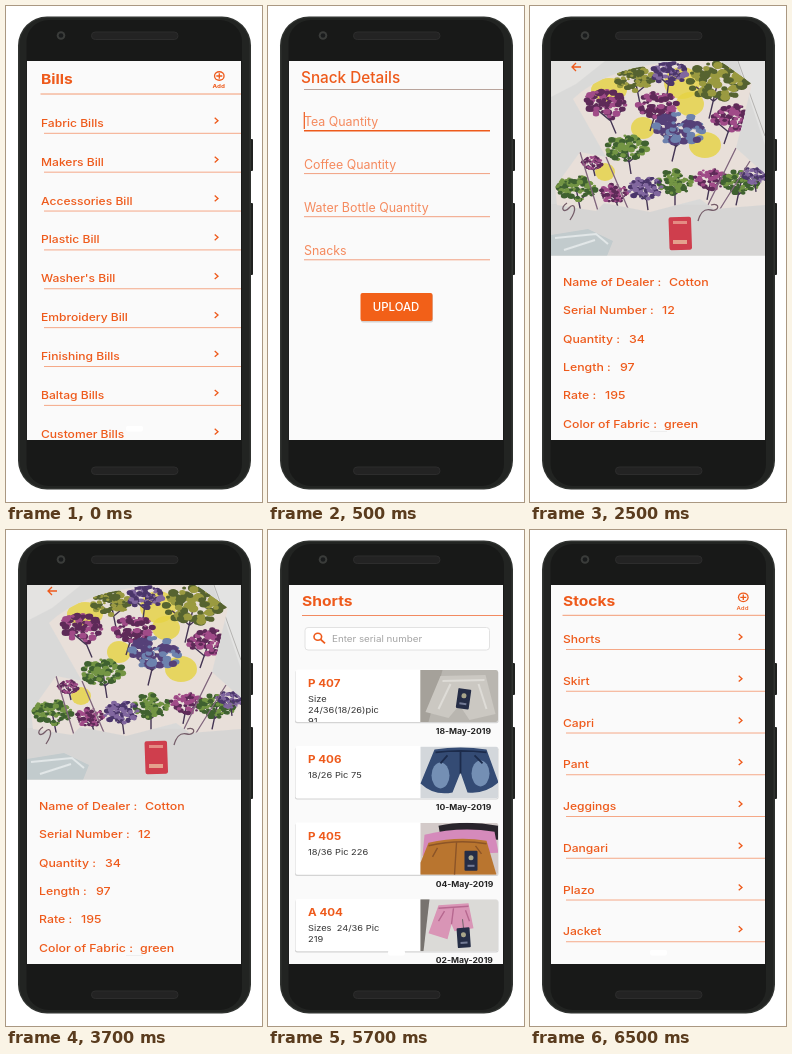
These frames come from a looping animation (256x496 px, 8000 ms). An HTML page:

```html
<!DOCTYPE html>
<html lang="en">
<head>
<meta charset="utf-8">
<title>Shop app screens</title>
<style>
  html, body { margin: 0; width: 100%; height: 100%; overflow: hidden; background: #fff; }
  svg { display: block; font-family: Inter, "Open Sans", sans-serif; }
  text { white-space: pre; }
</style>
</head>
<body>
<svg id="stage" width="256" height="496" viewBox="0 0 256 496"></svg>
<script>
const ORANGE = '#ee5a1b', RULE = '#f5a887', PAPER = '#fafafa';
const FLAT = .88; // most screens are shown with a slightly flattened aspect

const rect = (x, y, w, h, fill, r = 0, extra = '') =>
  `<rect x="${x}" y="${y}" width="${w}" height="${h}" rx="${r}" fill="${fill}" ${extra}/>`;
const text = (x, y, s, size, weight = 500, fill = ORANGE, aspect = FLAT) =>
  `<text transform="translate(${x} ${y}) scale(1 ${aspect})" font-size="${size}" font-weight="${weight}" fill="${fill}">${s}</text>`;
const path = (d, stroke, width = 1, fill = 'none') =>
  `<path d="${d}" stroke="${stroke}" stroke-width="${width}" fill="${fill}"/>`;
const shape = (d, fill) => path(d, 'none', 0, fill);
const circle = (x, y, r, fill, extra = '') =>
  `<circle cx="${x}" cy="${y}" r="${r}" fill="${fill}" ${extra}/>`;
const ellipse = (x, y, rx, ry, fill, opacity = 1) =>
  `<ellipse cx="${x}" cy="${y}" rx="${rx}" ry="${ry}" fill="${fill}" opacity="${opacity}"/>`;
const rule = (x, y, end = 235, color = RULE) => path(`M${x} ${y}H${end}`, color);
const clip = (id, content) => `<clipPath id="${id}">${content}</clipPath>`;

let seed = 7;
const random = () => (seed = seed * 16807 % 2147483647) / 2147483647;

function phone() {
  const speaker = y => rect(85.5, y, 86.5, 7.5, '#232323', 3.7, 'stroke="#2d2d2d"');
  return rect(243, 133, 4, 32, '#202220', 1) + rect(243, 197, 4, 72, '#202220', 1) +
    rect(12, 10.5, 233, 473, '#303330', 29) +
    rect(13.5, 12, 230, 470, '#222422', 27) +
    rect(20.5, 14, 215.5, 466, '#181918', 22) +
    speaker(26) + speaker(461) +
    circle(55, 29.5, 4.3, '#3a3c3a') + circle(55, 29.5, 2.3, '#191b1c');
}

const homePill = () => rect(120, 420, 17, 5.5, '#fff', 2);

function listScreen({ title, x, titleY, headY, first, step, addBold, items }) {
  const addY = headY - 18;
  const rows = items.map((name, i) => {
    const y = first + i * step;
    return text(x, y, name, 12.1) + rule(x + 3, y + 6.5) +
      path(`M208.7 ${y - 9}l3.3 2.9l-3.3 2.9`, ORANGE, 1.3);
  }).join('');
  return text(x, titleY, title, 15.6, 700) + rule(x - .5, headY, 235, '#f39a73') +
    ellipse(213.3, addY, 5.4, 4.9, ORANGE) + ellipse(213.3, addY, 4.1, 3.6, PAPER) +
    path(`M210.3 ${addY}h6M213.3 ${addY - 2.7}v5.4`, ORANGE, 1.3) +
    text(206.5, addY + 12.3, 'Add', 6.2, addBold ? 700 : 500) + rows + homePill();
}

function formScreen() {
  const fields = ['Tea Quantity', 'Coffee Quantity', 'Water Bottle Quantity', 'Snacks'];
  return text(33, 76.5, 'Snack Details', 15.3, 500, ORANGE, 1) + rule(36, 83.5, 235, '#b9a49c') +
    fields.map((name, i) => {
      const y = 119.7 + i * 43.1;
      return text(36, y, name, 12.4, 400, '#f58a5e', 1) +
        (i ? rule(36, y + 4.8, 222, '#f2a080') : path(`M36 ${y + 5}H222`, ORANGE, 1.6));
    }).join('') +
    path('M36.3 106V123', ORANGE, 1.2) +
    rect(93, 288, 72, 28.5, '#d5d1cf', 2) + rect(92.5, 287, 72, 28, '#f26018', 2) +
    text(104.8, 305.3, 'UPLOAD', 11.4, 500, '#fff', 1);
}

// A printed tree: forked trunk under a crown of small leaves in two tones.
function tree(x, y, r, light, dark, lean) {
  let leaves = '';
  for (let i = 0; i < 85; i++) {
    const a = random() * 6.283, d = Math.sqrt(random()) * r, size = r * (.05 + random() * .1);
    leaves += ellipse((x + Math.cos(a) * d).toFixed(1), (y + Math.sin(a) * d * .65).toFixed(1),
      (size * 1.3).toFixed(1), size.toFixed(1), random() < .5 ? light : dark);
  }
  return path(`M${x + lean} ${y + r * 1.3}L${x} ${y}M${x + lean * .5} ${y + r * .7}` +
    `l${-r * .6} ${-r * .5}M${x + lean * .5} ${y + r * .7}l${r * .6} ${-r * .5}`, '#453654', 1.4) + leaves;
}

const DRESS = 'M43 93Q75 62 147 55H190L222 78L206 142L235 168V199L184 203L170 193L120 206' +
  'L74 197L66 205L27 199L25 181L50 146L76 151Z';

function dressPhoto() {
  const green = ['#739544', '#3f6130'], olive = ['#9a9a40', '#566330'], plum = ['#a04b88', '#5e2a58'],
    violet = ['#81679f', '#4b366b'], blue = ['#6d82ae', '#554078'];
  const yellow = [[79, 84, 18, 12], [152, 77, 18, 16], [160, 98, 14, 12], [113, 122, 12, 11], [175, 139, 16, 13], [75, 166, 10, 9]]
    .map(([x, y, rx, ry]) => ellipse(x, y, rx, ry, '#e6d443', .8)).join('');
  const trees = [
    [74, 99, 22, plum, 12], [105, 73, 19, olive, 5], [140, 66, 18, violet, -3], [188, 75, 29, olive, -9],
    [128, 99, 20, plum, -8], [150, 123, 25, blue, -8], [203, 112, 20, plum, -9], [97, 142, 20, green, 4],
    [145, 176, 18, green, 0], [181, 173, 16, plum, -4], [115, 182, 17, violet, 3], [84, 187, 14, plum, 5],
    [46, 182, 19, green, 5], [211, 176, 18, green, -5], [224, 169, 13, violet, 2], [62, 157, 10, plum, 3]
  ].map(([x, y, r, [light, dark], lean]) => tree(x, y, r, light, dark, lean)).join('');
  return '<g clip-path="url(#photo)">' + rect(21, 55, 214, 195, '#d9d9d8') +
    shape('M21 55H75L46 78L21 91Z', '#e4e3e1') + shape('M207 55H235V139Z', '#e3e3e2') +
    path('M208 55L235 130', '#b5b3b1') +
    shape('M21 198L235 199V250H21Z', '#d6d5d4') +
    shape(DRESS, '#e8dfd9') + '<g clip-path="url(#dress)">' + yellow + trees +
    path('M76 151L99 205M206 142L176 203M50 146L68 205M220 155L190 203', '#80667d', 1.3) + '</g>' +
    path('M37 197c-8 5-3 11 2 5s9 0 1 12M181 199c10-3 8 7 0 5s-11 4-13 11', '#755d69', 1.3) +
    shape('M21 229L58 223L83 235L77 250H21Z', '#c2cbcd') +
    path('M25 232L66 228L78 238M34 244L65 234', '#e2e7e8', 2) +
    rect(139, 211, 22.5, 33, '#cf3e4d', 2, 'transform="rotate(-2 150 227)"') +
    rect(143, 215, 14, 3, '#e48b83') + rect(143, 234, 14, 4, '#e4a18d') + '</g>';
}

function detailScreen() {
  const rows = [['Name of Dealer :', 'Cotton', 139], ['Serial Number :', '12', 132], ['Quantity :', '34', 99],
    ['Length :', '97', 90], ['Rate :', '195', 75], ['Color of Fabric :', 'green', 134]];
  return dressPhoto() + path('M51 61H42M46 57L42 61L46 65', ORANGE, 1.3) +
    rows.map(([label, value, x], i) => {
      const y = 279.8 + i * 28.4;
      return text(33, y, label, 12.3) + text(x, y, value, 12.4);
    }).join('') + rule(120, 425.5, 137, '#eee');
}

const tag = (x, y, turn = 0) => `<g transform="translate(${x} ${y}) rotate(${turn})">` +
  rect(0, 0, 13, 20, '#252d46', 1) + circle(6.5, 7, 2.5, '#a8a58a') + rect(3, 14, 7, 2, '#737b96') + '</g>';

// Thumbnails are drawn in a 78 x 52 box.
const thumbs = [
  rect(0, 0, 78, 52, '#b9b6b0') + shape('M0 0H22L8 52H0Z', '#a5a19a') +
    shape('M20 6L65 5L75 44L49 50L39 35L28 48L5 42Z', '#cbc8c2') +
    path('M22 11L64 10M30 14L18 39M58 14L66 39', '#dedcd7', 2) + tag(38, 18, 8),
  rect(0, 0, 78, 52, '#d3d7db') + shape('M14 3Q40 -1 66 3L78 36Q65 48 47 46L40 26L32 46Q14 50 0 37Z', '#344b74') +
    ellipse(20, 29, 9, 13, '#7f9cc0', .85) + ellipse(60, 27, 9, 13, '#7f9cc0', .85) +
    path('M15 6Q40 3 66 6M40 5V27M27 9L20 17M54 9L62 17', '#1c2b4b', 1.8),
  rect(0, 0, 78, 52, '#d3cac9') + shape('M18 3Q45 -3 78 3V17L20 14Z', '#29252c') +
    shape('M4 12Q40 3 74 9L78 30L2 33Z', '#d58abb') + shape('M8 20Q38 13 66 18L76 52H0V40Z', '#b9752f') +
    path('M8 23Q38 16 66 21M36 20L34 52M17 25L12 34M55 23L61 31', '#8c5427', 1.4) + tag(44, 28),
  rect(0, 0, 78, 52, '#dbdad7') + shape('M0 0H9L3 52H0Z', '#77736f') +
    shape('M18 6L48 4L53 29L34 32L31 25L27 40L8 34Z', '#d995b6') +
    path('M18 9L48 7M33 9L31 25M24 12L18 22M45 11L49 22', '#b76890', 1.4) +
    path('M42 20L43 29', '#555', .8) + tag(36, 29, -4)
];

function stockScreen() {
  const items = [
    ['P 407', ['Size', '24/36(18/26)pic', '91'], '18-May-2019'],
    ['P 406', ['18/26 Pic 75'], '10-May-2019'],
    ['P 405', ['18/36 Pic 226'], '04-May-2019'],
    ['A 404', ['Sizes  24/36 Pic', '219'], '02-May-2019']
  ];
  return text(34, 75.8, 'Shorts', 15.6, 700) + rule(34, 85.5, 235, '#f28a60') +
    rect(37, 97.5, 184.5, 22.5, '#fff', 3, 'stroke="#e2e2e2"') +
    ellipse(49.8, 106.8, 4.6, 4.3, ORANGE) + ellipse(49.8, 106.8, 3, 2.7, '#fff') +
    path('M52.6 109.4L57 113.4', ORANGE, 1.8) +
    text(64, 111.8, 'Enter serial number', 9.8, 400, '#a3a3a3') +
    items.map(([name, lines, date], i) =>
      `<g transform="translate(0 ${140 + i * 76.4})">` +
      rect(27, .8, 203.5, 52.4, '#d4d4d4', 2) + rect(27.5, -.3, 202.5, 52.3, '#fff', 2) +
      '<g clip-path="url(#card)">' + text(40, 16.8, name, 11.6, 700) +
      lines.map((s, n) => text(40, 31.8 + n * 11, s, 9.3, 400, '#333')).join('') +
      `<g transform="translate(152.5 0)">${thumbs[i]}</g></g>` +
      text(167.7, 64, date, 8.6, 700, '#222') + '</g>').join('') + homePill();
}

const screens = [
  [0, listScreen({ title: 'Bills', x: 35, titleY: 78.3, headY: 88, first: 120.8, step: 38.87, addBold: true,
    items: ['Fabric Bills', 'Makers Bill', 'Accessories Bill', 'Plastic Bill', "Washer's Bill",
      'Embroidery Bill', 'Finishing Bills', 'Baltag Bills', 'Customer Bills'] })],
  [500, formScreen()],
  [2500, detailScreen()],
  [4500, stockScreen()],
  [6500, listScreen({ title: 'Stocks', x: 33, titleY: 75.8, headY: 85.3, first: 113, step: 41.75,
    items: ['Shorts', 'Skirt', 'Capri', 'Pant', 'Jeggings', 'Dangari', 'Plazo', 'Jacket'] })]
];

const stage = document.getElementById('stage');
stage.innerHTML = '<defs>' + clip('screen', rect(21, 55, 214, 379)) + clip('photo', rect(21, 55, 214, 194.5)) +
  clip('card', rect(27.5, 0, 202.5, 52, '#000', 2)) + clip('dress', shape(DRESS, '#000')) + '</defs>' + phone() +
  '<g clip-path="url(#screen)">' + rect(21, 55, 214, 379, PAPER) +
  screens.map(([, art]) => `<g class="view">${art}</g>`).join('') + '</g>';
const views = [...stage.querySelectorAll('.view')];

const start = performance.now();
function draw() {
  const t = (performance.now() - start) % 8000;
  const current = screens.filter(([at]) => at <= t).length - 1;
  views.forEach((view, i) => view.style.display = i === current ? '' : 'none');
  requestAnimationFrame(draw);
}
draw();
</script>
</body>
</html>
```
